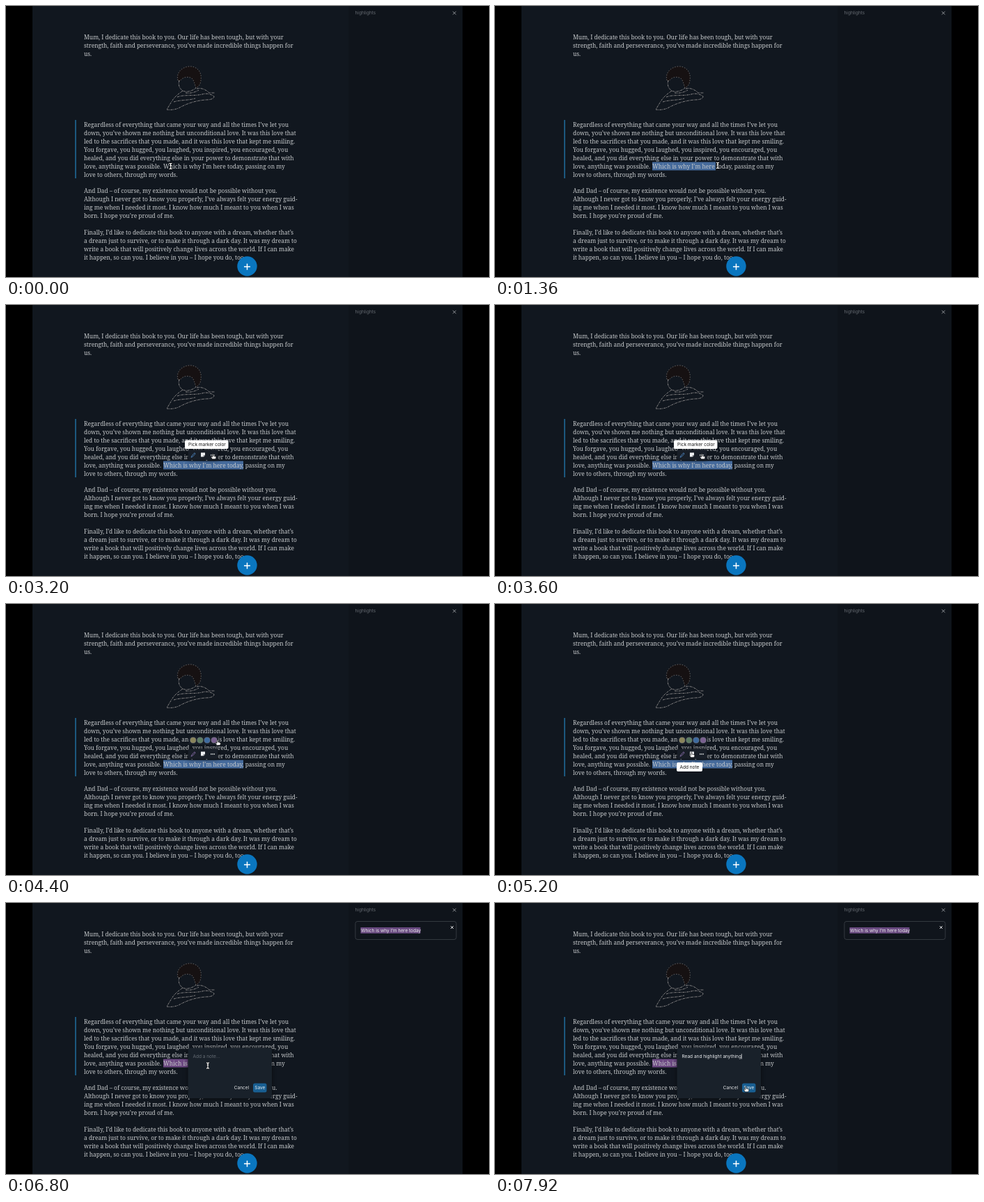
An HTML page for the animation above (8 s loop, 694 px wide and 390 px high).

```html
<!DOCTYPE html>
<html lang="en">
<head>
<meta charset="utf-8">
<title>Highlight and note</title>
<style>
  html, body { margin: 0; width: 100%; height: 100%; overflow: hidden; background: #000; }
  svg { display: block; width: 694px; height: 390px; }
  text { white-space: pre; font: 6.5px Inter, Roboto, sans-serif; }
  #book text { font: 8.3px "Noto Serif", "DejaVu Serif", serif; font-size: inherit; fill: #c6c9cb; }
  #book { font-size: 8.3px; }
  #sketch path { fill: none; stroke: #b9b4b0; stroke-width: .7; stroke-dasharray: 3 .8 1 1.1; }
  #sketch .hair { fill: #161112; stroke-width: .5; stroke-dasharray: 1.5 2; }
  .shadow { filter: drop-shadow(0 1px 3px #0008); }
</style>
</head>
<body>
<svg viewBox="0 0 694 390">
  <rect width="694" height="390" fill="#000"/>
  <rect x="38" width="455" height="390" fill="#11171f"/>
  <rect x="492.5" width="163.5" height="390" fill="#0f141b"/>
  <rect x="99" y="164" width="2" height="84" fill="#1c587e"/>

  <g id="sketch">
    <path class="hair" d="M247 107C244 97 252 88 263 87C274 86 282 95 280 106C280 112 277 116 273 118C271 112 270 107 267 104C261 101 254 102 250 108Z"/>
    <path d="M249 107C247 113 249 119 254 122C260 125 268 122 273 118"/>
    <path d="M274 119C281 117 288 121 292 125L300 125"/>
    <path d="M254 122C247 127 242 131 239 136C235 142 233 146 231 149C237 150 243 149 248 147"/>
    <path d="M246 131C256 127 270 130 282 127C289 125 295 127 299 130C299 134 293 135 287 135C275 136 262 139 248 147"/>
    <path d="M258 125C266 126 272 124 277 121M241 138C250 135 262 136 272 133"/>
  </g>

  <rect id="mark" x="226" y="224.5" height="12" fill="#456a9b"/>
  <g id="book"></g>

  <g id="bar">
    <rect x="261.5" y="208.5" width="43" height="14.5" rx="2" fill="#181e27" class="shadow"/>
    <path id="pen" d="M266 219.3l1-2.3 3.8-4.2 1.3 1.2-3.8 4.2z" fill="none" stroke-width=".9"/>
    <path d="M280 212.5h6v4l-2 2h-4z" fill="#eef0f2"/>
    <path d="M286 216.5h-2v2" fill="none" stroke="#181e27" stroke-width=".5"/>
    <path d="M294 216h6" stroke="#e4e6e8" stroke-width="1.3" stroke-dasharray="1.4 .9"/>
  </g>
  <g id="dots"><rect x="263" y="190.5" width="42" height="11.5" rx="2" fill="#181e27"/></g>
  <g id="pickTip">
    <rect x="257" y="194.5" width="62.5" height="12.5" rx="2" fill="#fff"/>
    <text x="262" y="203" fill="#111">Pick marker color</text>
  </g>
  <g id="noteTip">
    <rect x="261" y="228" width="37" height="13" rx="2" fill="#fff"/>
    <text x="265.5" y="236.8" fill="#111">Add note</text>
  </g>

  <g id="dialog">
    <rect x="261.5" y="208.5" width="120.5" height="72.5" rx="3" fill="#19212a" class="shadow"/>
    <text id="note" x="268.5" y="223.2"></text>
    <path id="caret" stroke="#eee" stroke-width=".7"/>
    <text x="327.8" y="268.3" fill="#e4e6e8">Cancel</text>
    <rect x="355" y="259.5" width="19.5" height="13" rx="2.5" fill="#195f92"/>
    <text x="357.3" y="268.3" fill="#e9edf0">Save</text>
  </g>

  <text x="501.5" y="11.6" fill="#656a71">highlights</text>
  <path d="M642 7.8l4.6 4.6m0-4.6l-4.6 4.6" stroke="#8d9196" stroke-width="1"/>
  <g id="card">
    <rect x="502" y="26.5" width="145" height="26" rx="3" fill="#10151c" stroke="#3d434a" stroke-width=".8"/>
    <rect x="509.5" y="35" width="86" height="8.8" fill="#694a80"/>
    <text x="510" y="41.8" fill="#eee">Which is why I’m here today</text>
    <path d="M639 33.2l3.8 3.8m0-3.8l-3.8 3.8" stroke="#e6e8ea" stroke-width="1"/>
  </g>

  <circle cx="346.5" cy="374.5" r="14.2" fill="#0a76bf"/>
  <path d="M342 375.3h9m-4.5-4.5v9" stroke="#fff" stroke-width="1.5"/>

  <g id="beam" fill="none">
    <path id="beamShape" d="M-2-4.2Q0-4.2 0-2.8Q0-4.2 2-4.2M0-3V3M-2 4.2Q0 4.2 0 2.8Q0 4.2 2 4.2M-1.3-1h2.6" stroke="#000" stroke-width="2.2"/>
    <use href="#beamShape"/>
    <path d="M-2-4.2Q0-4.2 0-2.8Q0-4.2 2-4.2M0-3V3M-2 4.2Q0 4.2 0 2.8Q0 4.2 2 4.2M-1.3-1h2.6" stroke="#fff" stroke-width="1.2"/>
  </g>
  <path id="hand" d="M-1.6 3.8L-3.5.7q-.3-1 .8-.8L-1.5 1V-3.2q.8-1.2 1.6 0V-.6q1-.6 1.4.2q1-.5 1.3.4q1-.2 1 .8V2.2L2.8 3.8Z" fill="#fff" stroke="#000" stroke-width=".6"/>
</svg>
<script>
const $ = id => document.getElementById(id);
const LOOP = 8000, STEP = 80, LEAD = 11.93, LEFT = 112, COLUMN = 307;
const MARK_X = 226, MARK_W = 115;
const NOTE = 'Read and highlight anything';

function add(parent, tag, attrs, content = '') {
  const el = document.createElementNS('http://www.w3.org/2000/svg', tag);
  for (const k in attrs) el.setAttribute(k, attrs[k]);
  el.textContent = content;
  return parent.appendChild(el);
}

// Paragraphs: first baseline, then lines. "|" begins the markable phrase.
const paragraphs = [
  [48.2, `Mum, I dedicate this book to you. Our life has been tough, but with your
strength, faith and perseverance, you’ve made incredible things happen for
us.`],
  [174, `Regardless of everything that came your way and all the times I’ve let you
down, you’ve shown me nothing but unconditional love. It was this love that
led to the sacrifices that you made, and it was this love that kept me smiling.
You forgave, you hugged, you laughed, you inspired, you encouraged, you
healed, and you did everything else in your power to demonstrate that with
love, anything was possible. |Which is why I’m here today, passing on my
love to others, through my words.`],
  [269.4, `And Dad – of course, my existence would not be possible without you.
Although I never got to know you properly, I’ve always felt your energy guid-
ing me when I needed it most. I know how much I meant to you when I was
born. I hope you’re proud of me.`],
  [329.1, `Finally, I’d like to dedicate this book to anyone with a dream, whether that’s
a dream just to survive, or to make it through a dark day. It was my dream to
write a book that will positively change lives across the world. If I can make
it happen, so can you. I believe in you – I hope you do, too.`]
];
for (const [top, body] of paragraphs)
  body.split('\n').forEach((line, row) =>
    line.split('|').forEach((part, i) =>
      add($('book'), 'text', { x: i ? MARK_X : LEFT, y: top + row * LEAD }, part)));

// The widest line decides the type size of the whole column.
const widest = Math.max(...[...$('book').children].map(t => t.getComputedTextLength()));
$('book').style.fontSize = 8.3 * COLUMN / widest + 'px';

['#89845a', '#5c7c62', '#3d6a9f', '#79608f'].forEach((fill, i) =>
  add($('dots'), 'circle', { cx: 268.8 + i * 10.1, cy: 196, r: 4.1, fill, stroke: '#9aa0a6', 'stroke-width': .4 }));

// Pointer path: time, x, y
const path = [
  [0, 236.5, 230.5], [80, 236.5, 230.5], [320, 227, 230.5], [1120, 227, 230.5],
  [1360, 320, 229.5], [1520, 341, 230], [2000, 341, 230], [2400, 270, 217],
  [2640, 270, 217], [2960, 297, 217], [3200, 298, 218], [3680, 298, 218],
  [3920, 270, 198], [4080, 275, 198], [4400, 304.5, 199.5], [4640, 304.5, 199.5],
  [4960, 283, 217], [5600, 283, 217], [5920, 275, 256], [6080, 290, 234],
  [7440, 290, 234], [7840, 361, 268], [LOOP, 361, 268]
];
const clamp = v => Math.min(1, Math.max(0, v));
const ease = v => v * v * (3 - 2 * v);

function pointer(t) {
  const i = path.findIndex(p => p[0] > t);
  const [t0, x0, y0] = path[i - 1], [t1, x1, y1] = path[i];
  const k = ease((t - t0) / (t1 - t0));
  return [x0 + (x1 - x0) * k, y0 + (y1 - y0) * k];
}
const show = (id, on) => $(id).setAttribute('display', on ? 'inline' : 'none');

function draw(t) {
  const [x, y] = pointer(t);
  const within = (l, top, r, b) => x > l && x < r && y > top && y < b;
  const noted = t >= 5360, barOn = t >= 1680 && !noted, dotsOn = t >= 3680 && !noted;

  const drag = t < 1120 ? 0 : t >= 1520 ? MARK_W : Math.min(MARK_W, Math.max(0, x - MARK_X - 3));
  $('mark').setAttribute('width', noted ? MARK_W : drag);
  $('mark').setAttribute('fill', noted ? '#6d4983' : '#456a9b');
  $('pen').setAttribute('stroke', t < 4320 ? '#4b80b8' : '#846ba5');

  show('bar', barOn);
  show('dots', dotsOn);
  show('pickTip', t >= 2960 && t < 3680);
  show('noteTip', t >= 4960 && !noted);
  show('dialog', noted);
  show('card', noted);

  const typed = NOTE.slice(0, Math.ceil(clamp((t - 7040) / 560) * NOTE.length));
  const note = $('note');
  note.textContent = typed || 'Add a note...';
  note.setAttribute('fill', typed ? '#eceef0' : '#666d75');
  show('caret', typed);
  if (typed) $('caret').setAttribute('d', `M${268.9 + note.getComputedTextLength()} 217v7.5`);

  const onButton = barOn && within(261, 208, 305, 223) || dotsOn && within(263, 190, 307, 203)
    || noted && within(354, 259, 375, 273);
  show('hand', onButton);
  show('beam', !onButton);
  $(onButton ? 'hand' : 'beam').setAttribute('transform', `translate(${x} ${y})`);
}

function tick() {
  const t = performance.now() % LOOP;
  draw(Math.floor(t / STEP) * STEP);
  requestAnimationFrame(tick);
}
tick();
</script>
</body>
</html>
```
